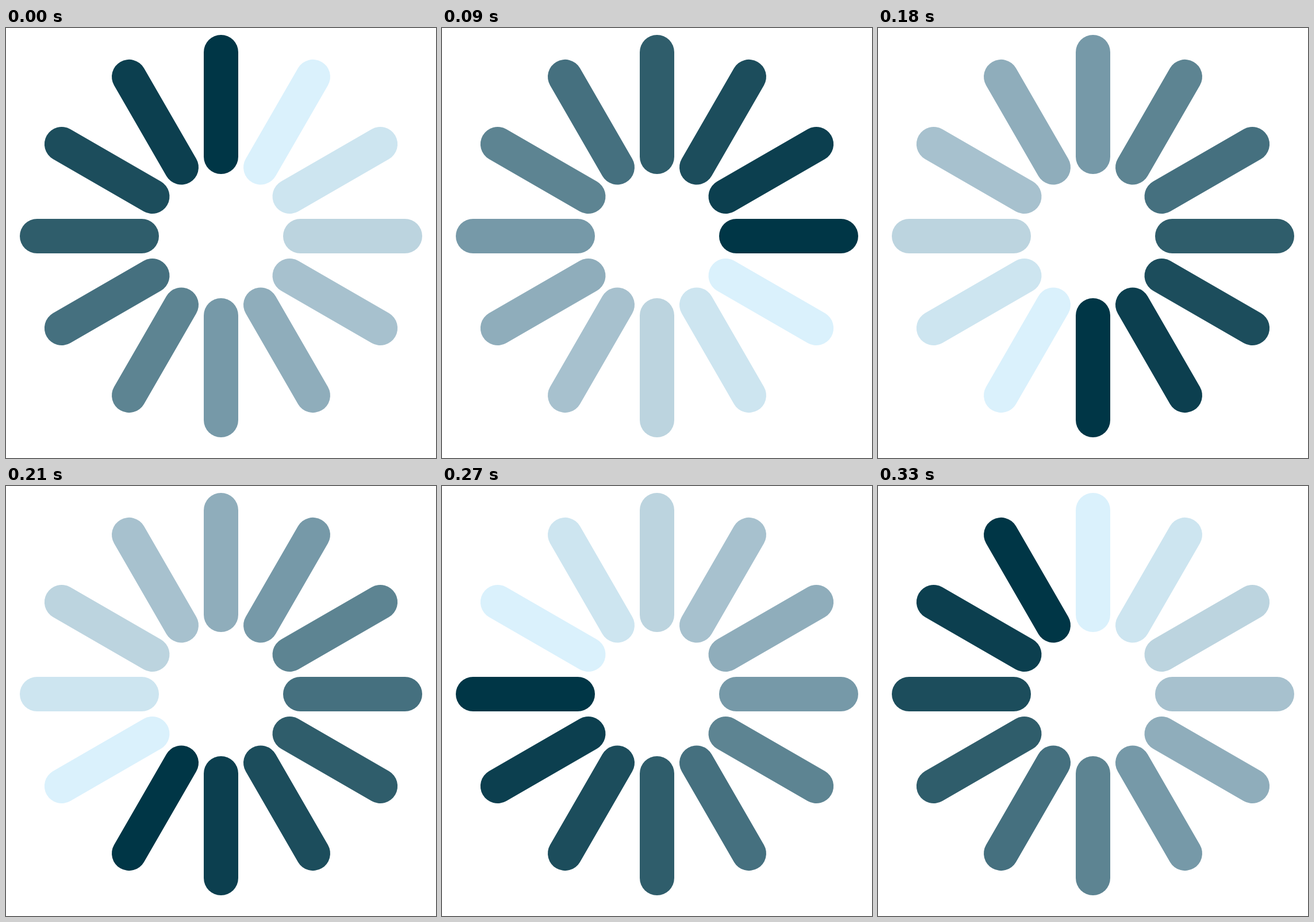
An HTML page with a canvas for the animation above (0.36 s loop, 748 px wide and 748 px high).

```html
<!DOCTYPE html>
<html lang="en">
<head>
<meta charset="utf-8">
<title>Spinner</title>
<style>
  html, body { margin: 0; width: 100%; height: 100%; overflow: hidden; background: #fff; }
  canvas { display: block; }
</style>
</head>
<body>
<canvas id="stage" width="748" height="748"></canvas>
<script>
const ctx = document.getElementById('stage').getContext('2d');
const SIZE = 748;
const CENTER = { x: 374, y: 362 };
const INNER = 138, OUTER = 320, WIDTH = 60;
const STEP_MS = 30;

// From the leading bar back to the oldest one
const SHADES = [
  '#003646', '#0c3f4f', '#1c4d5c', '#2f5d6b', '#45707f', '#5d8492',
  '#7699a8', '#8fadbb', '#a7c1ce', '#bcd4df', '#cde5f0', '#daf1fc'
];
const COUNT = SHADES.length;

function drawBar(index, color) {
  const angle = index / COUNT * Math.PI * 2;
  const dx = Math.sin(angle), dy = -Math.cos(angle);
  ctx.strokeStyle = color;
  ctx.beginPath();
  ctx.moveTo(CENTER.x + dx * INNER, CENTER.y + dy * INNER);
  ctx.lineTo(CENTER.x + dx * OUTER, CENTER.y + dy * OUTER);
  ctx.stroke();
}

function draw(time) {
  const lead = Math.floor(time / STEP_MS) % COUNT;
  ctx.fillStyle = '#fff';
  ctx.fillRect(0, 0, SIZE, SIZE);
  ctx.lineWidth = WIDTH;
  ctx.lineCap = 'round';
  for (let i = 0; i < COUNT; i++) {
    drawBar(i, SHADES[(lead - i + COUNT) % COUNT]);
  }
}

let start = null;
function tick(now) {
  start ??= now;
  draw(Math.max(0, now - start));
  requestAnimationFrame(tick);
}

draw(0);
requestAnimationFrame(tick);
</script>
</body>
</html>
```
